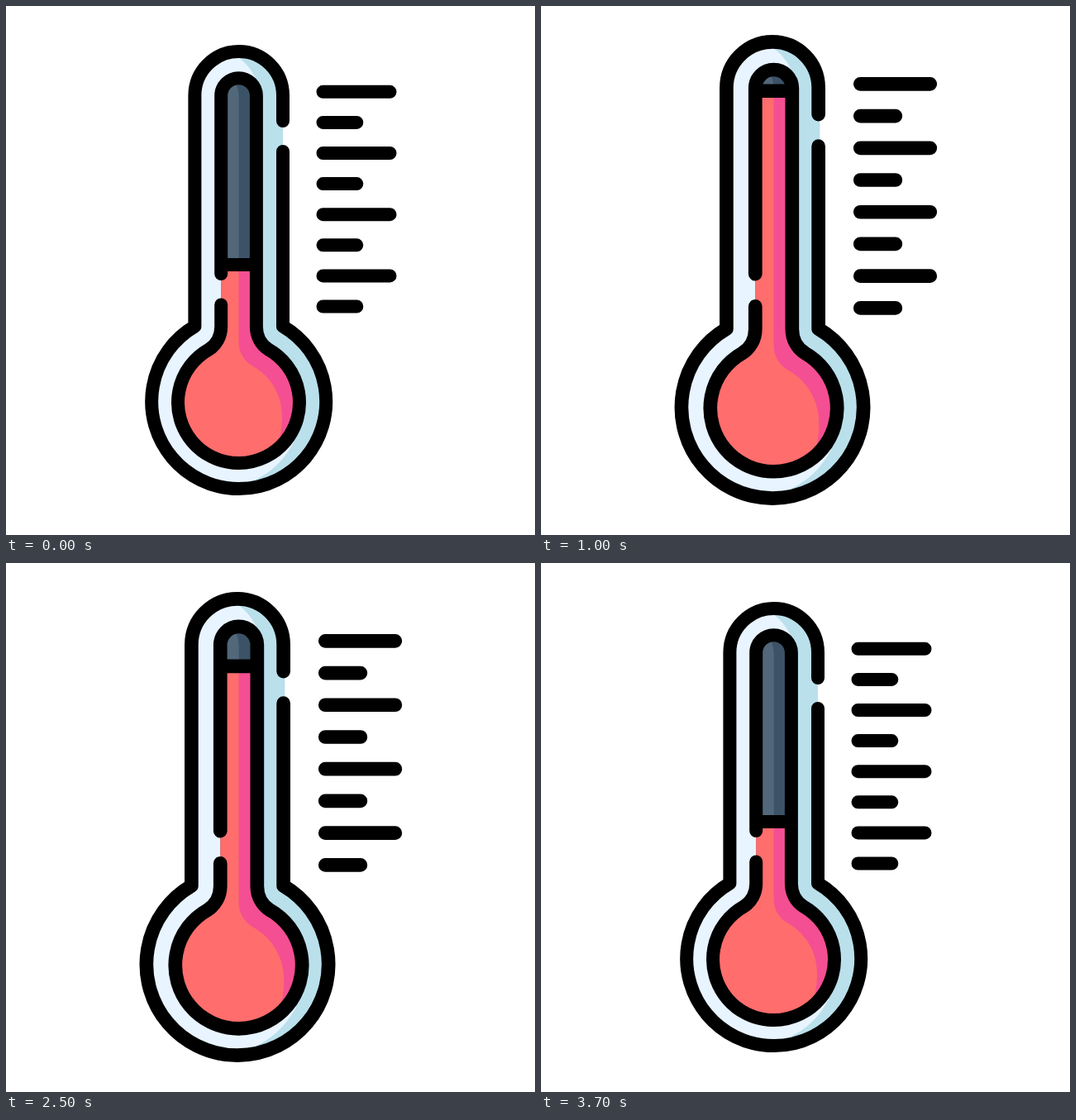
An HTML page for the animation above (3800 ms loop, 640 px wide and 640 px high).

```html
<!DOCTYPE html>
<html lang="en">
<head>
<meta charset="utf-8">
<title>Thermometer</title>
<style>
  html, body { margin: 0; width: 100%; height: 100%; overflow: hidden; background: #fff; }
  svg { display: block; width: 100vw; height: 100vh; }
  .line { fill: none; stroke: #000; stroke-width: 16; stroke-linecap: round; stroke-linejoin: round; }
</style>
</head>
<body>
<svg viewBox="0 0 640 640">
  <defs>
    <clipPath id="glassClip">
      <path d="M228.4 108.3A53.3 53.3 0 0 1 335 108.3V388.5A105.5 105.5 0 1 1 228.4 388.5Z"/>
    </clipPath>
    <clipPath id="tubeClip">
      <path d="M260.2 108.5A21.35 21.35 0 0 1 302.9 108.5V388C302.9 399.5 308.5 409.8 317.5 415.5A73.5 73.5 0 1 1 245.5 415.5C254.5 409.8 260.2 399.5 260.2 388Z"/>
    </clipPath>
  </defs>

  <g id="inner">
    <g clip-path="url(#glassClip)">
      <path fill="#e8f4ff" d="M160 40H400V600H160Z"/>
      <path fill="#bae0ec" d="M264 52C290 64 306 84 306 108V400L348 528C334 554 313 572 284 579L270 600H400V40H264Z"/>
    </g>
    <g clip-path="url(#tubeClip)">
      <path fill="#52677a" d="M250 80H310V400H250Z"/>
      <path fill="#3c5267" d="M272 85Q281.7 95 281.7 110V400H310V80H272Z"/>
      <g id="liquid">
        <path fill="#ff6d6d" d="M190 0H370V570H190Z"/>
        <path fill="#f44f92" d="M281.6 0V407C281.6 419 288 430 299 436C320 448 334 470 334 497C334 508 333 517 329 530L370 560V0Z"/>
      </g>
    </g>
    <path id="bar" class="line" style="stroke-linecap:butt" d="M260.2 0H302.9"/>
    <path class="line" d="M260.2 361.5V388C260.2 399.5 254.5 409.8 245.5 415.5A73.5 73.5 0 1 0 317.5 415.5C308.5 409.8 302.9 399.5 302.9 388V108.5A21.35 21.35 0 0 0 260.2 108.5V324"/>
  </g>

  <g id="outer" class="line">
    <path d="M335 139V108.3A53.3 53.3 0 0 0 228.4 108.3V387.5A105.5 105.5 0 1 0 335 387.5V176"/>
    <path id="ticks"/>
  </g>
</svg>
<script>
  const $ = id => document.getElementById(id);
  const LOOP = 3800, STEP = 100;
  const LOW = 313, HIGH = 94.1, GROWTH = 0.05;

  // Ease with flat ends; a and b are the x positions of the two handles.
  function ease(x, a, b) {
    if (x <= 0) return 0;
    if (x >= 1) return 1;
    let lo = 0, hi = 1;
    for (let i = 0; i < 30; i++) {
      const s = (lo + hi) / 2, r = 1 - s;
      if (3 * a * s * r * r + 3 * b * s * s * r + s * s * s < x) lo = s;
      else hi = s;
    }
    return lo * lo * (3 - 2 * lo);
  }

  const scaleAbout = (x, y, s) =>
    `translate(${x} ${y}) scale(${s}) translate(${-x} ${-y})`;

  function draw(time) {
    const rising = time < 2250;
    const x = time < STEP ? 0
      : rising ? (time + 95) / 1800
      : (time - 2250) / 1450;
    const phase = (a, b) => rising ? ease(x, a, b) : 1 - ease(x, a, b);

    const scale = 1 + GROWTH * phase(0.335, 0.25);
    const level = LOW + (HIGH - LOW) * phase(0.333, 0.06);

    $('inner').setAttribute('transform', scaleAbout(281.6, 320, scale));
    $('outer').setAttribute('transform', scaleAbout(320, 320, scale));
    $('bar').setAttribute('transform', `translate(0 ${level})`);
    $('liquid').setAttribute('style',
      `clip-path: polygon(0 ${level}px, 640px ${level}px, 640px 640px, 0 640px)`);
    $('liquid').querySelectorAll('path').forEach((p, i) => p.setAttribute('d', liquidPath(i, level)));
  }

  function liquidPath(i, top) {
    return i === 0
      ? `M190 ${top}H370V570H190Z`
      : `M281.6 ${top}V407C281.6 419 288 430 299 436C320 448 334 470 334 497C334 508 333 517 329 530L370 560V${top}Z`;
  }

  $('liquid').removeAttribute('style');
  $('ticks').setAttribute('d', Array.from({ length: 8 }, (_, i) =>
    `M383.5 ${103.8 + i * 37.1}H${i % 2 ? 424.3 : 464.5}`).join(''));

  const start = performance.now();
  function frame() {
    const time = (performance.now() - start) % LOOP;
    draw(Math.floor(time / STEP) * STEP);
    $('liquid').removeAttribute('style');
    requestAnimationFrame(frame);
  }
  frame();
</script>
</body>
</html>
```
